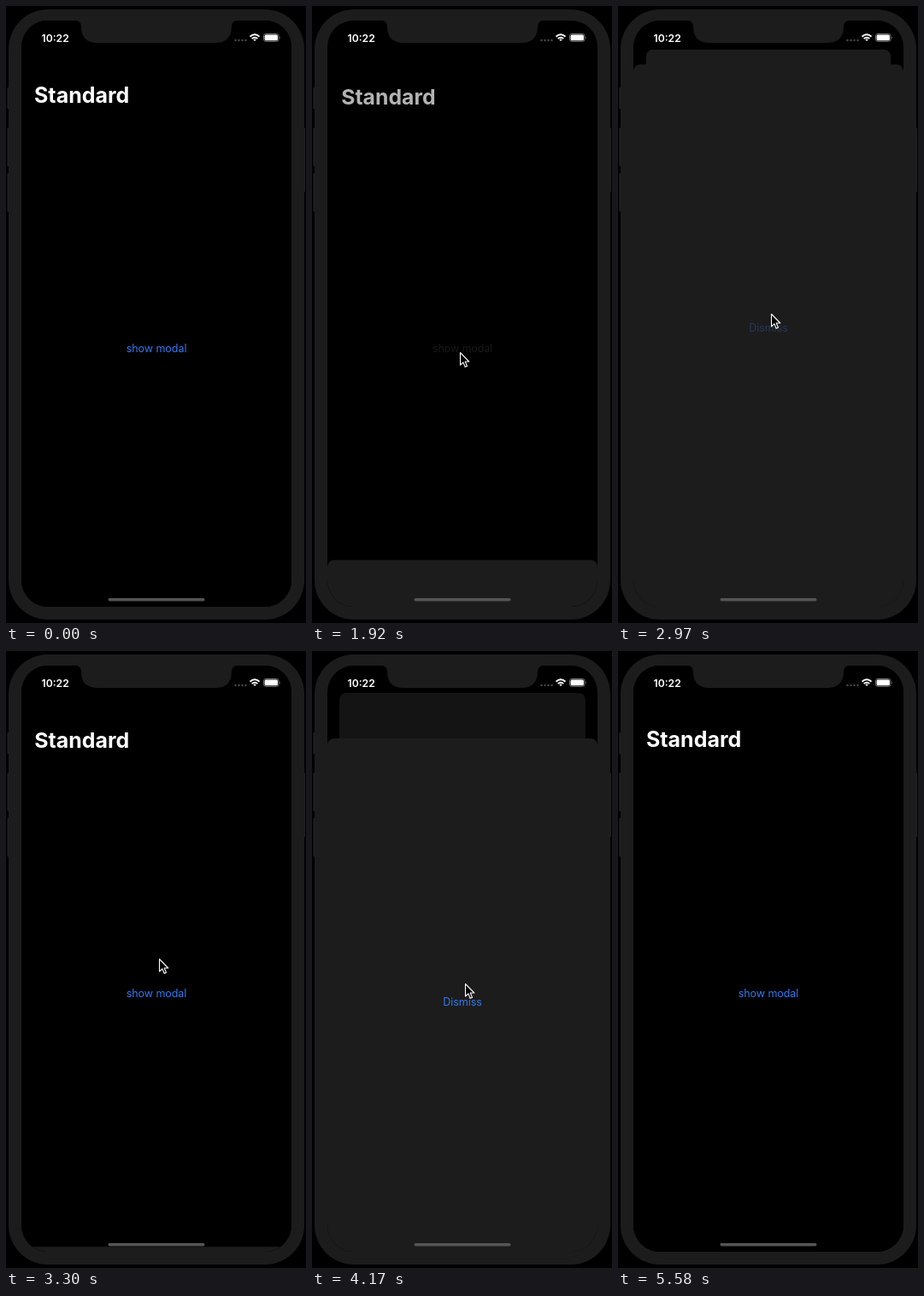
Write an HTML page that moves like this. It is 351 px wide and 720 px high and loops after 6030 ms.

```html
<!DOCTYPE html>
<html lang="en">
<head>
<meta charset="utf-8">
<title>Modal presentation</title>
<style>
  html, body { margin: 0; width: 100%; height: 100%; overflow: hidden; background: #000; }
  svg { display: block; width: 100vw; height: 100vh; }
  text { font-family: Inter, Roboto, sans-serif; }
  .title { font-size: 25px; font-weight: 700; fill: #fff; }
  .link { font-size: 12.6px; letter-spacing: -.1px; fill: #3478f0; text-anchor: middle; }
  .clock { font-size: 12.2px; font-weight: 600; fill: #fff; }
</style>
</head>
<body>
<svg viewBox="0 0 351 720">
  <defs>
    <clipPath id="screen"><rect x="18" y="17" width="316" height="684" rx="31"/></clipPath>
  </defs>

  <g fill="#222">
    <rect x="1.5" y="95" width="4" height="25" rx="1"/>
    <rect x="1.5" y="142" width="4" height="45" rx="1"/>
    <rect x="1.5" y="195" width="4" height="45" rx="1"/>
    <rect x="346" y="142" width="4" height="75" rx="1"/>
  </g>
  <rect x="3" y="4" width="346" height="712" rx="46" fill="#1c1c1c"/>

  <g clip-path="url(#screen)">
    <rect x="18" y="17" width="316" height="684"/>
    <g id="card">
      <rect id="page" x="18" y="17" width="316" height="720" rx="9"/>
      <g id="content">
        <text class="title" x="33" y="112.5" textLength="">Standard</text>
        <text id="show" class="link" x="176" y="404">show modal</text>
      </g>
    </g>
    <g id="sheet">
      <rect x="18" y="0" width="316" height="720" rx="8" fill="#1c1c1c"/>
      <text id="dismiss" class="link" x="176" y="311.5">Dismiss</text>
    </g>
  </g>

  <path fill="#1c1c1c" d="M82 16V17Q88 18 88 24Q88 43 107 43H245Q264 43 264 24Q264 18 270 17V16Z"/>
  <text class="clock" x="41.5" y="41.5">10:22</text>
  <g fill="#444">
    <circle cx="268.5" cy="40" r="1.3"/><circle cx="272.5" cy="40" r="1.3"/>
    <circle cx="276.5" cy="40" r="1.3"/><circle cx="280.5" cy="40" r="1.3"/>
  </g>
  <g fill="none" stroke="#fff" stroke-width="1.9">
    <path d="M285.5 35.8Q291 30.8 296.500 35.8"/>
    <path d="M287.700 38.100Q291 35.200 294.300 38.100"/>
    <path d="M289.300 39.200L291 41L292.700 39.200Q291 38 289.300 39.200Z" fill="#fff" stroke="none"/>
  </g>
  <rect x="301.500" y="32.500" width="17.500" height="8.800" rx="2.500" fill="none" stroke="#777"/>
  <rect x="302.600" y="33.600" width="15.300" height="6.600" rx="1.500" fill="#fff"/>
  <path d="M320 35.500Q321.600 37 320 38.500Z" fill="#777"/>
  <rect x="119.500" y="691" width="113" height="3.600" rx="1.800" fill="#555"/>

  <path id="cursor" fill="#000" stroke="#fff" stroke-width="1.100" stroke-linejoin="round"
        d="M.5.500V15L3.900 11.900L6.200 17.200L8.500 16.200L6.200 11H10.800Z"/>
</svg>
<script>
  const LOOP = 6030, STEP = 30, OMEGA = 0.019;
  const REST = 63, BOTTOM = 703;
  const SHOW = [1894, 3933], HIDE = [2963, 4876];
  // time, x, y of the pointer tip
  const PATH = [
    [660, 338, 250], [1230, 174, 416], [1440, 174, 416], [1740, 173, 404],
    [2280, 173, 404], [2790, 179, 359], [3300, 179, 359], [3780, 179, 388],
    [4260, 179, 388], [4740, 180, 377], [5070, 180, 377], [5460, 352, 330]
  ];
  const $ = id => document.getElementById(id);
  const [card, page, content, show, sheet, dismiss, cursor] =
    ['card', 'page', 'content', 'show', 'sheet', 'dismiss', 'cursor'].map($);

  const clamp = v => Math.min(1, Math.max(0, v));
  const smooth = v => { v = clamp(v); return v * v * (3 - 2 * v); };
  // Critically damped spring from 0 to 1
  const spring = ms => ms <= 0 ? 0 : 1 - (1 + OMEGA * ms) * Math.exp(-OMEGA * ms);
  const pressed = (t, starts) => starts.some(s => t > s - 110 && t < s + 40);

  function pointer(t) {
    const i = PATH.findIndex(k => k[0] > t);
    if (i < 1) return null;
    const [t0, x0, y0] = PATH[i - 1], [t1, x1, y1] = PATH[i];
    const k = smooth((t - t0) / (t1 - t0));
    return [x0 + (x1 - x0) * k, y0 + (y1 - y0) * k];
  }

  function draw(t) {
    const run = t < 3600 ? 0 : 1;
    const open = t >= SHOW[run] && t < HIDE[run];
    const p = spring(t - SHOW[run]) - spring(t - HIDE[run]);
    const dim = open ? 0.7 : 1;

    card.setAttribute('transform',
      `translate(176 ${17 + 34 * p}) scale(${1 - 0.095 * p}) translate(-176 -17)`);
    const tone = Math.round(28 * dim * smooth((p - 0.4) / 0.5));
    page.setAttribute('fill', `rgb(${tone},${tone},${tone})`);
    content.setAttribute('opacity', dim);
    show.style.fill = open ? '#222' : '';
    show.setAttribute('opacity', !open && pressed(t, SHOW) ? 0.25 : 1);

    sheet.setAttribute('transform', `translate(0 ${BOTTOM - (BOTTOM - REST) * p})`);
    dismiss.setAttribute('opacity', pressed(t, HIDE) ? 0.3 : 1);

    const at = pointer(t);
    cursor.style.display = at ? '' : 'none';
    if (at) cursor.setAttribute('transform', `translate(${at})`);
  }

  function tick() {
    const t = performance.now() % LOOP;
    draw(Math.floor(t / STEP) * STEP);
    requestAnimationFrame(tick);
  }
  tick();
</script>
</body>
</html>
```
